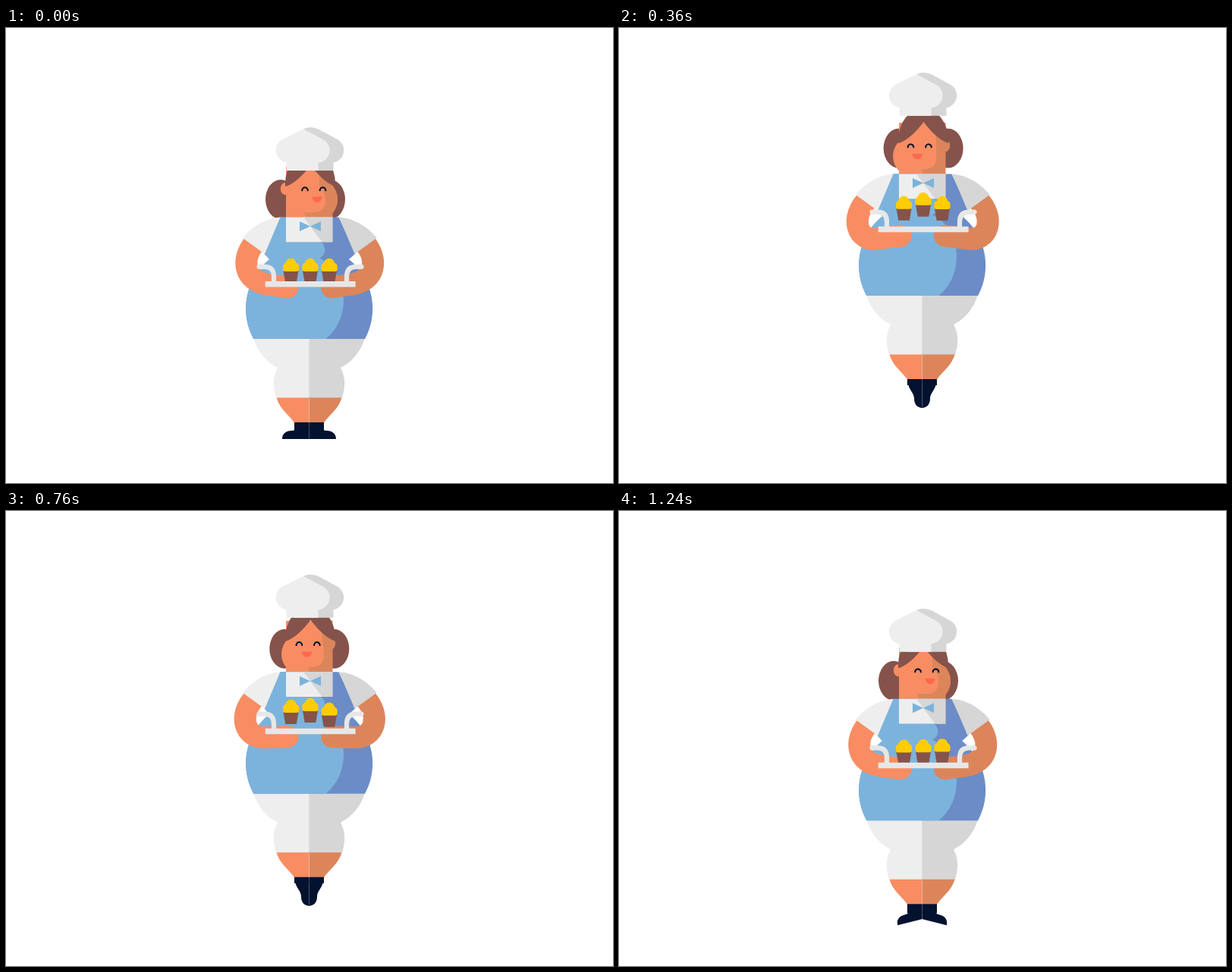
An HTML page with a canvas that plays this animation: 800 by 600 pixels, repeating every 1.28 s.

```html
<!DOCTYPE html>
<html lang="en">
<head>
<meta charset="utf-8">
<title>Jumping baker</title>
<style>
  html, body { margin: 0; width: 100%; height: 100%; overflow: hidden; background: #fff; }
  canvas { display: block; }
</style>
</head>
<body>
<canvas id="stage" width="800" height="600"></canvas>
<script>
const ctx = document.getElementById('stage').getContext('2d');
const LOOP = 1280, JUMP = 640, STEP = 40;
const C = {
  hair: '#85534b', skin: '#f88d63', skinDark: '#dc855b', white: '#eeeeee', grey: '#d6d6d6',
  blue: '#7cb3dc', blueDark: '#6b8cc7', navy: '#03122f', yellow: '#ffcc05', mouth: '#ff684c', tray: '#e7e7e7'
};

const lerp = (a, b, t) => a + (b - a) * t;
const clamp = v => Math.min(1, Math.max(0, v));
const smooth = v => { v = clamp(v); return v * v * (3 - 2 * v); };

// Cubic bezier easing with handles (x1, 0) and (x2, 1).
function ease(x, x1, x2) {
  let lo = 0, hi = 1;
  for (let i = 0; i < 24; i++) {
    const s = (lo + hi) / 2, r = 1 - s;
    if (3 * s * r * r * x1 + 3 * s * s * r * x2 + s * s * s < x) lo = s; else hi = s;
  }
  return smooth(lo);
}

// Height of the jump, 0..1, for phase u.
function lift(u) {
  u = clamp(u);
  return ease(1 - Math.abs(2 * u - 1), 0.475, 0.05);
}

function fill(color, path) {
  ctx.fillStyle = color;
  ctx.fill(typeof path === 'string' ? new Path2D(path) : path);
}

function stroke(color, width, path, cap = 'round') {
  ctx.strokeStyle = color;
  ctx.lineWidth = width;
  ctx.lineCap = cap;
  ctx.stroke(new Path2D(path));
}

function ellipse(path, x, y, rx, ry = rx) {
  path.moveTo(x + rx, y);
  path.ellipse(x, y, rx, ry, 0, 0, 2 * Math.PI);
}

function group(dy, draw) {
  ctx.save();
  ctx.translate(0, dy);
  draw();
  ctx.restore();
}

// Draws the left part and its reflection; `sum` is left x + right x.
function pair(sum, draw) {
  draw(false);
  ctx.save();
  ctx.translate(sum, 0);
  ctx.scale(-1, 1);
  draw(true);
  ctx.restore();
}

function buns(turn) {
  const p = new Path2D();
  ellipse(p, 362 + 7.3 * turn, 226, 20, 26);
  ellipse(p, 427 + 7.3 * turn, 226, 20, 26);
  fill(C.hair, p);
}

function face(turn) {
  const head = new Path2D();
  head.rect(369, 182, 61.3, 68);
  ellipse(head, 404 - 11 * turn, 226, 33, 30);
  ellipse(head, 368 + 12 * turn, 212, 6.2, 8);
  ellipse(head, 419 + 12 * turn, 212, 6.2, 8);
  fill(C.skin, head);

  const edge = 413 + 5 * turn, cheek = 421 - 3 * turn, chin = 392 + 8 * turn;
  ctx.save();
  ctx.clip(head);
  fill(C.skinDark, `M${edge} 170V208Q${cheek} 215 ${cheek} 227
    Q${cheek} 243 ${cheek - 17} 243H${chin}L${lerp(397, 400, turn)} 250H450V170Z`);
  ctx.restore();

  for (const x of [394, 417.5])
    stroke(C.navy, 2.1, `M${x - 10.5 * turn - 3.8} 214.2a3.8 4 0 0 1 7.6 0`);
  fill(C.mouth, `M${403.4 - 18.5 * turn} 222.6h13.2a6.6 7.4 0 0 1 -13.2 0Z`);
  fill(C.hair, `M368 209V205A33 42 0 0 1 434 205V209Q419 204 401.5 181Q383 205 368 209Z`);
}

function hat() {
  fill(C.grey, `M380 188V150L392 133.2Q402 128.5 413 134L435 146
    A16.5 16.5 0 0 1 431.5 177.5V188Z`);
  fill(C.white, `M369.5 188V177.5A16.5 16.5 0 0 1 366 146L392 133.2L416 146
    A16.3 16.3 0 0 1 411.5 177.5V188Z`);
}

function legs(point) {
  pair(799, dark => {
    fill(dark ? C.skinDark : C.skin, 'M356 486C360 502 372 509 380 520.5H399.6V486Z');
    fill(dark ? C.grey : C.white,
      'M326 409C332 428 344 441 358 448C352 459 351 472 356 487.5H399.6V409Z');
    ctx.save();
    ctx.beginPath();
    ctx.rect(340, 500, 59.7, 80);
    ctx.clip();
    fill(C.navy, `M380 520H400V${lerp(533, 528, point)}H380Z`);
    ctx.translate(390, 532);
    ctx.rotate(-point * Math.PI / 2);
    fill(C.navy, 'M-26 10C-26 3 -21 -1 -14 -1C-6 -1 -4 -7 6 -9L10 -8V10Z');
    ctx.restore();
  });
  stroke('rgba(255,255,255,.3)', 0.8, `M399.6 488V${lerp(541, 556, point)}`, 'butt');
}

function torso() {
  const dress = new Path2D('M326.3 410A83.5 83.5 0 1 1 473 410Z');
  dress.addPath(new Path2D('M361 249.5H438.5L461 297L452 305H347L340 297Z'));
  fill(C.blueDark, dress);
  ctx.save();
  ctx.clip(dress);
  fill(C.blue, `M300 249H400V282H414C422 285 423 299 413 303.5
    C430 310 445 334 445 358C445 380 436 398 421.5 410H300Z`);
  ctx.restore();
  fill(C.white, 'M369 249.5H430.3V282.3H369Z');
  fill(C.grey, 'M392 249.5H430.3V282.3H416.5Z');
  fill(C.blue, 'M387 255L401 261.5L387 268ZM415 255L401 261.5L415 268Z');
}

function arms(j) {
  const p = (x0, y0, x1, y1) => `${lerp(x0, x1, j)} ${lerp(y0, y1, j)} `;
  const arm = 'M328 283C' + p(309, 305, 304, 306) + p(314, 333, 313, 340) +
    p(344, 338, 342, 334.5) + 'L' + p(371, 342, 371, 331);
  pair(800.5, dark => {
    stroke(dark ? C.skinDark : C.skin, 29, arm);
    fill(dark ? C.grey : C.white, 'M361.5 249.5C340 251 322 264 312 277L341 298Z');
  });
}

function cake(x, y) {
  ctx.save();
  ctx.translate(x, y);
  fill(C.hair, 'M-10 -16H10L7.3 0H-7.3Z');
  const icing = new Path2D();
  ellipse(icing, 0, -25, 7.2);
  icing.roundRect(-10.6, -26.5, 21.2, 11.5, [5, 5, 3, 3]);
  fill(C.yellow, icing);
  ctx.restore();
}

function tray() {
  pair(802, () => stroke(C.tray, 6.2, 'M333.5 314.8H341Q353 314.8 353 328V334.5'));
  fill(C.tray, 'M341.7 334H460.6V341.5H341.7Z');
}

function draw(time) {
  const t = Math.floor(time % LOOP / STEP) * STEP;
  const second = t >= JUMP;
  const ms = t % JUMP, u = ms / JUMP;
  const j = lift(u);
  const swing = ease(u, 0.33, 0);
  const turn = second ? 1 - swing : swing;
  const point = smooth(ms / 120) * smooth((JUMP - ms) / 160);
  const bodyY = -57.3 * j, topY = -72.7 * j;
  const early = 10 * lift(u + 0.04) * (u > 0), late = 10 * lift(u - 0.04);

  ctx.fillStyle = '#fff';
  ctx.fillRect(0, 0, 800, 600);
  group(-66 * j - 2 * turn, () => buns(turn));
  group(bodyY, () => face(turn));
  group(topY, hat);
  group(bodyY, () => {
    legs(point);
    torso();
    arms(j);
  });
  group(topY, () => {
    cake(375.5, 336 - (second ? early : late));
    cake(401, 336 - 15 * j);
    cake(426, 336 - (second ? late : early));
    tray();
  });
}

const start = performance.now();
function tick() {
  draw(performance.now() - start);
  requestAnimationFrame(tick);
}
tick();
</script>
</body>
</html>
```
